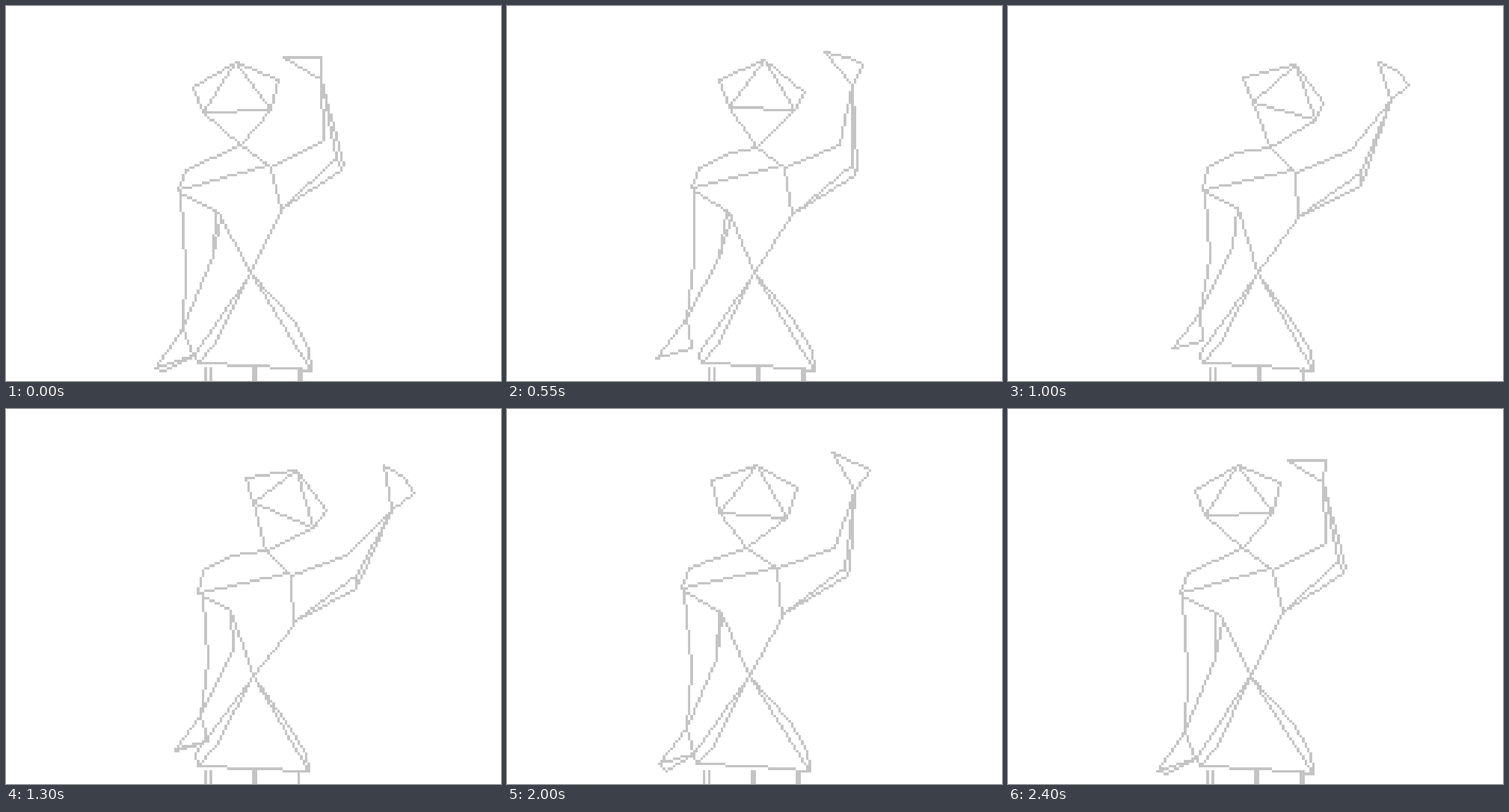
An HTML page with a canvas that plays this animation: 859x652 px, repeating every 2450 ms.

```html
<!DOCTYPE html>
<html lang="en">
<head>
<meta charset="utf-8">
<title>Swaying wireframe figure</title>
<style>
html, body { margin: 0; width: 100%; height: 100%; overflow: hidden; background: #fff; }
canvas { position: absolute; left: 0; top: 0; width: 859px; height: 654px; image-rendering: pixelated; }
</style>
</head>
<body>
<canvas id="stage" width="197" height="150"></canvas>
<script>
const LOOP = 2450, STEP = 50, CELL = 859 / 197;
const ctx = document.getElementById('stage').getContext('2d');

// Times of the six key poses; each joint holds x, y for every pose.
const KEYS = [-25, 550, 1000, 1300, 1650, 2000];

const head = {
  crown:  [397,97, 447,95, 499,102, 505,106, 483,102, 434,98],
  earL:   [326,140, 367,130, 409,123, 418,119, 398,115, 354,124],
  cheekL: [343,187, 385,175, 423,166, 430,165, 407,170, 367,182],
  cheekR: [459,182, 500,182, 532,198, 535,206, 517,206, 485,189],
  earR:   [472,129, 515,149, 549,170, 556,177, 538,162, 502,137],
  neck:   [406,243, 432,245, 454,245, 450,245, 437,242, 416,242]
};
const torso = {
  slope:  [358,263, 390,255, 395,254, 390,254, 378,257, 365,261],
  top:    [312,287, 334,281, 346,280, 341,280, 330,275, 314,277],
  tip:    [298,319, 321,317, 338,320, 335,320, 323,309, 302,311],
  shoulder: [459,280, 484,282, 500,288, 496,290, 485,285, 469,279],
  sideL:  [367,360, 386,358, 398,352, 391,350, 381,352, 371,356],
  sideR:  [476,357, 497,363, 505,370, 500,375, 493,372, 478,362],
  waist:  [423,463, 431,463, 433,463, 431,463, 423,463, 422,463]
};
const armR = {
  bend:   [550,234, 578,242, 597,250, 593,253, 580,246, 567,240],
  wrist:  [547,127, 601,136, 667,165, 670,177, 652,157, 605,140],
  inner:  [573,262, 598,279, 613,290, 608,291, 594,284, 586,278],
  elbow:  [581,284, 605,294, 614,312, 610,311, 600,307, 593,292],
  thumb:  [483,91, 552,80, 643,97, 656,97, 627,90, 564,76],
  palm:   [550,88, 619,102, 697,137, 710,144, 684,127, 628,105]
};
const armL = {
  outer:  [312,455, 327,437, 351,437, 351,440, 343,440, 319,450],
  inside: [359,435, 368,437, 390,418, 395,418, 381,413, 364,432],
  hand:   [306,562, 310,541, 333,536, 339,534, 329,543, 312,557],
  finger: [260,629, 258,611, 284,595, 294,593, 280,597, 264,616],
  heel:   [325,607, 321,594, 340,580, 350,577, 339,585, 326,600],
  under:  [275,635, 258,613, 285,597, 295,595, 288,613, 276,628]
};
const sway = { hem: [0,625, 4,625, 3,625, -1,624, -5,622, -4,622] };
const joints = Object.assign({}, head, torso, armR, armL, sway);

const outline = [
  'crown earL cheekL crown cheekR earR crown',
  'cheekL cheekR neck cheekL',
  'neck slope top tip collar',
  'neck shoulder sideR waist sideL strap',
  'tip strap outer hand finger heel hand inside armpit',
  'finger under heel',
  'inside armpit2',
  'shoulder bend wrist inner pit elbow inner',
  'elbow crook wrist thumb knuckle palm wrist',
  'waist kneeL hemL shin waist hemR calf kneeR waist',
  'hemL hemMid hemR'
];

const keyTime = i => KEYS[(i + 6) % 6] + Math.floor(i / 6) * LOOP;

// Periodic cubic interpolation over unevenly spaced keys.
function sample(track, axis, t) {
  let i = 5;
  while (t < KEYS[i]) i--;
  const val = k => track[((k + 6) % 6) * 2 + axis];
  const slope = k => {
    const a = keyTime(k) - keyTime(k - 1), b = keyTime(k + 1) - keyTime(k);
    return ((val(k) - val(k - 1)) / a * b + (val(k + 1) - val(k)) / b * a) / (a + b);
  };
  const h = keyTime(i + 1) - keyTime(i), u = (t - keyTime(i)) / h, v = 1 - u;
  return val(i) * v * v * (1 + 2 * u) + val(i + 1) * u * u * (1 + 2 * v)
    + h * u * v * (slope(i) * v - slope(i + 1) * u);
}

const shift = (p, dx, dy) => [p[0] + dx, p[1] + dy];
const mix = (a, b, k) => [a[0] + (b[0] - a[0]) * k, a[1] + (b[1] - a[1]) * k];

function pose(t) {
  const p = {};
  for (const name in joints) p[name] = [sample(joints[name], 0, t), sample(joints[name], 1, t)];
  const lean = (1 - Math.cos(2 * Math.PI * (t + 25) / LOOP)) / 2;
  const [dx, y] = p.hem;

  p.strap = shift(p.tip, 6, 5);
  p.collar = shift(p.shoulder, -5, -3);
  p.pit = shift(p.sideR, 4, -5);
  p.crook = shift(p.elbow, 4, -9);
  p.armpit = shift(p.sideL, -5 * (1 - lean), 0);
  p.armpit2 = mix(p.sideL, p.waist, 0.1 * (1 - lean));

  const mid = mix(p.thumb, p.palm, 0.6);
  const curl = 5 * lean / Math.hypot(p.palm[0] - p.thumb[0], p.palm[1] - p.thumb[1]);
  p.knuckle = shift(mid, (p.palm[1] - p.thumb[1]) * curl, (p.thumb[0] - p.palm[0]) * curl);

  p.kneeL = [330 + dx, y - 23];
  p.shin = [364 + dx, y - 37];
  p.hemL = [334 + dx, y - 3];
  p.kneeR = [497 + dx - 13 * lean, y - 77 - 8 * lean];
  p.calf = [527 + dx - 3 * lean, y - 26];
  p.hemR = [528 + dx, y + 8];
  p.hemMid = [433 + dx, y];
  return p;
}

function line(a, b) {
  let [x, y, x2, y2] = [...a, ...b].map(n => Math.floor(n / CELL));
  const dx = Math.abs(x2 - x), dy = Math.abs(y2 - y);
  const sx = Math.sign(x2 - x), sy = Math.sign(y2 - y);
  let err = dx - dy;
  for (;;) {
    ctx.fillRect(x, y, 1, 1);
    if (x === x2 && y === y2) return;
    const e = 2 * err;
    if (e > -dy) { err -= dy; x += sx; }
    if (e < dx) { err += dx; y += sy; }
  }
}

function draw(t) {
  const p = pose(t);
  ctx.fillStyle = '#fff';
  ctx.fillRect(0, 0, 197, 150);
  ctx.fillStyle = '#c4c4c4';
  for (const path of outline) {
    const pts = path.split(' ').map(n => p[n]);
    for (let i = 1; i < pts.length; i++) line(pts[i - 1], pts[i]);
  }
  const legs = [p.hemL[0] + 14, p.hemL[0] + 21, p.hemMid[0] - 3, p.hemMid[0] + 1,
    p.hemR[0] - 20, p.hemR[0] - 17];
  for (const x of legs) line([x, 632], [x, 653]);
}

function tick(now) {
  draw(Math.floor(now % LOOP / STEP) * STEP);
  requestAnimationFrame(tick);
}
draw(0);
requestAnimationFrame(tick);
</script>
</body>
</html>
```
